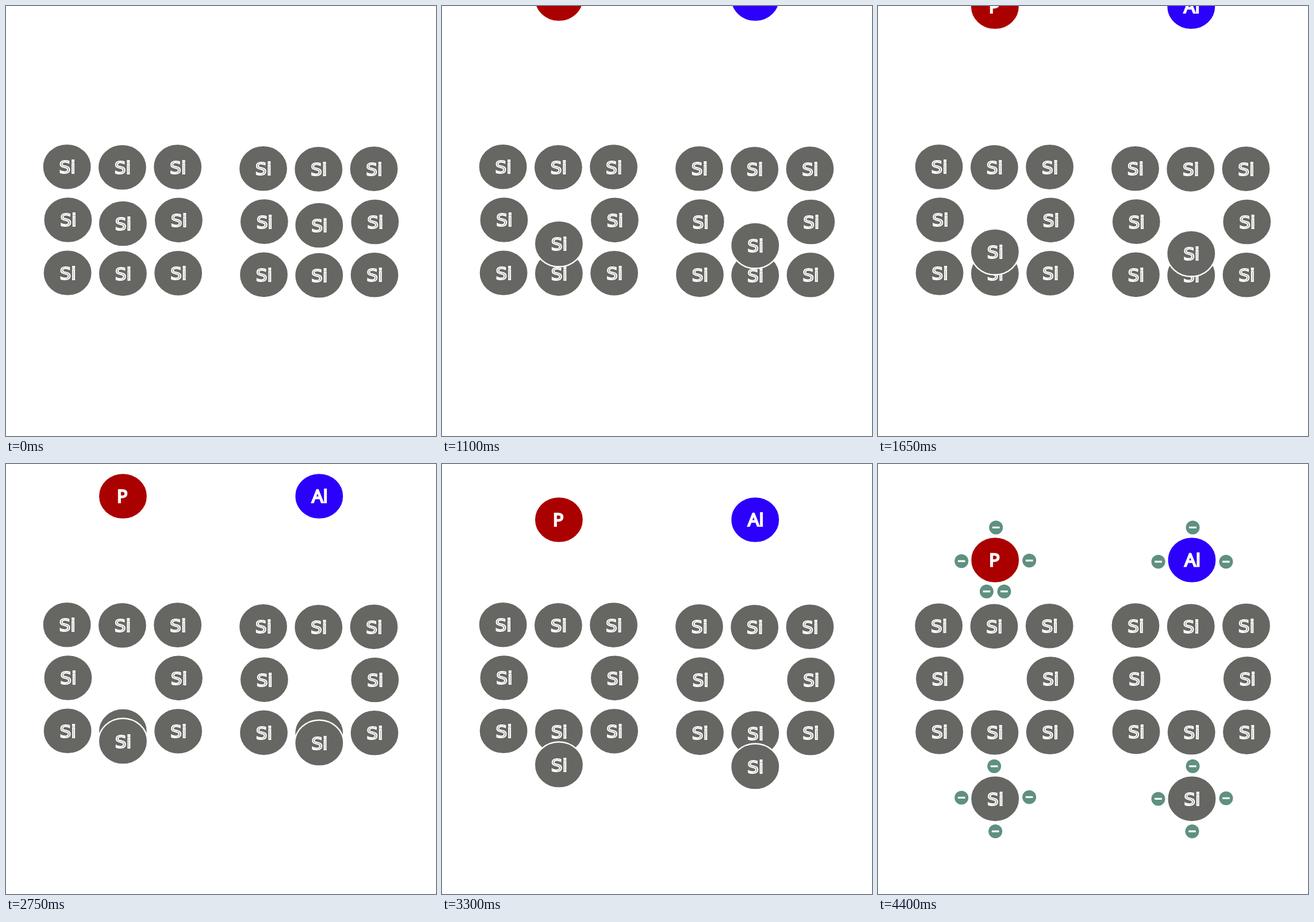
An HTML page for the animation above (8 s loop, 748 px wide and 748 px high).

```html
<!DOCTYPE html>
<html lang="en">
<head>
<meta charset="utf-8">
<title>Doping silicon</title>
<style>
  html, body { margin: 0; width: 100%; height: 100%; overflow: hidden; background: #fff; }
  svg { display: block; width: 100%; height: 100%; }
  text { text-anchor: middle; stroke: #fff; }
  .si { font: 31px "DejaVu Sans", sans-serif; fill: #666763; stroke-width: 2.2px; }
  .dopant { font: 31px "Open Sans", sans-serif; fill: #fff; stroke-width: 2.5px; }
</style>
</head>
<body>
<svg id="stage" viewBox="0 0 748 748"></svg>
<script>
const GREEN = '#5f9080';
const LOOP = 8000, STEP = 550;
const TRAVEL = [0, 14, 35, 49, 77, 104, 145, 187];   // px moved at each step

// dx centres the visible glyphs in the disc
const KINDS = {
  Si: { color: '#666763', font: 'si', dx: 0.5 },
  P: { color: '#ab0000', font: 'dopant', dx: -1.1 },
  Al: { color: '#2c00fa', font: 'dopant', dx: 1 }
};

function atom(x, y, label) {
  const { color, font, dx } = KINDS[label];
  return `<g transform="translate(${x} ${y})">
    <ellipse rx="42.6" ry="40" fill="${color}" stroke="#fff" stroke-width="2.4"/>
    <text class="${font}" x="${dx}" y="11.4">${label}</text></g>`;
}

const electron = (x, y) => `<circle cx="${x}" cy="${y}" r="12" fill="${GREEN}"/>
  <rect x="${x - 6.3}" y="${y - 1.6}" width="12.6" height="3.2" fill="#fff"/>`;

// Electrons around an atom, at angles in degrees clockwise from the right
const shell = (x, y, angles) => angles.map(a => {
  const t = a * Math.PI / 180;
  return electron(x + 0.5 + 59 * Math.cos(t), y + 56.6 * Math.sin(t));
}).join('');

// 3 x 3 block without its centre, rows and columns slightly uneven
function block(x, y) {
  let out = '';
  for (let row = 0; row < 3; row++) {
    for (let col = 0; col < 3; col++) {
      if (row === 1 && col === 1) continue;
      out += atom(x + 96.25 * col + [0, 1.8, 1][row], y + 92.3 * row + [0, 1.1, 0.4][col], 'Si');
    }
  }
  return out;
}

// One half of the picture: lattice, silicon leaving, dopant arriving
const half = (left, top, x, siY, dopant, dopantY) =>
  block(left, top) + atom(x, siY, 'Si') + atom(x, dopantY, dopant);

function scene(step) {
  if (step < TRAVEL.length) {
    const d = TRAVEL[step];
    return half(106.1, 279.7, 203.4, 378.5 + d, 'P', d - 48) +
      half(447.5, 282.8, 544.8, 381.5 + d, 'Al', d - 48);
  }
  const xl = 203.7, xr = 546, top = 167, bottom = 582.4;
  return half(105.7, 281.3, xl, bottom, 'P', top) +
    half(448, 281.1, xr, bottom, 'Al', top) +
    shell(xl, top, [-89, 178, 1, 105, 75]) + shell(xr, top, [-89, 177, 3]) +
    shell(xl, bottom, [-92, 182, -3, 90]) + shell(xr, bottom, [-89, 180, -1, 90]);
}

const stage = document.getElementById('stage');
let shown = -1;
function draw(now) {
  const step = Math.min(Math.floor(now % LOOP / STEP), TRAVEL.length);
  if (step !== shown) stage.innerHTML = scene(shown = step);
  requestAnimationFrame(draw);
}
draw(performance.now());
</script>
</body>
</html>
```
